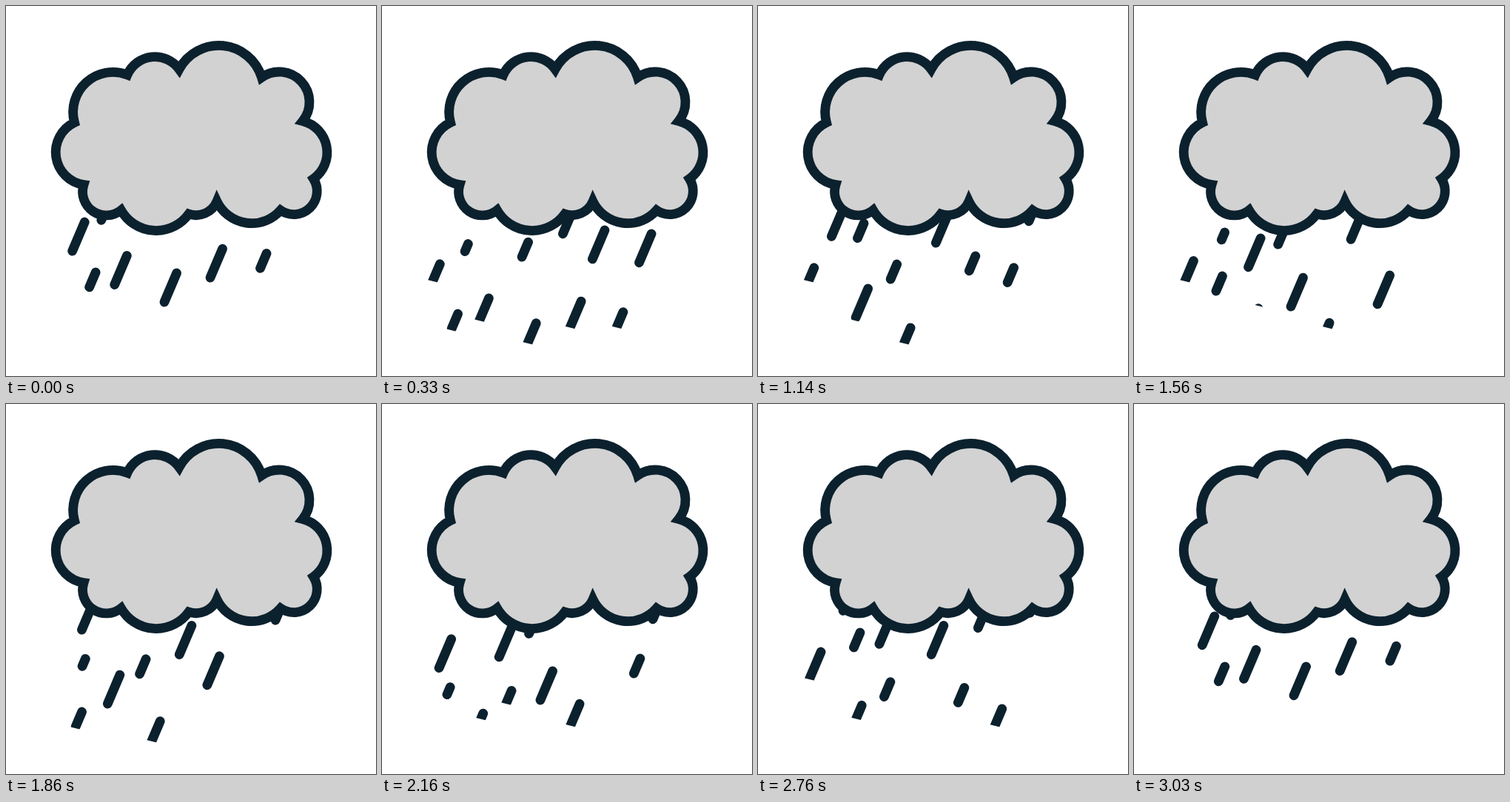
These frames come from a looping animation (500x500 px, 3060 ms). An HTML page with a canvas:

```html
<!DOCTYPE html>
<html lang="en">
<head>
<meta charset="utf-8">
<title>Rain cloud</title>
<style>
  html, body { margin: 0; width: 100%; height: 100%; overflow: hidden; background: #fff; }
  canvas { display: block; }
</style>
</head>
<body>
<canvas id="stage" width="500" height="500"></canvas>
<script>
const LOOP = 3060, STEP = 30;
const INK = '#0c212e', GREY = '#d2d2d2';
const LONG = 39, SHORT = 20, TINY = 10; // drop heights
const LEAN = 0.425, TILT = 0.25, LEVEL = 400;
const ctx = document.getElementById('stage').getContext('2d');

// One arc per puff, clockwise from the left.
const cloud = new Path2D(`M92.5 157.5
  A54 54 0 0 1 164 93       A40.5 40.5 0 0 1 234 85.5
  A60.6 60.6 0 0 1 345.5 96.5 A40.9 40.9 0 0 1 401 155.5
  A43.7 43.7 0 0 1 415.5 233.5 A31.4 31.4 0 0 1 371 276
  A52 52 0 0 1 285 264      A30.5 30.5 0 0 1 247 281
  A54.5 54.5 0 0 1 155.5 276 A32 32 0 0 1 105 241.5
  A44.4 44.4 0 0 1 92.5 157.5Z`);

// Drops fall along a slanted lane; the leftmost lanes slant more.
const drift = x => 0.33 + Math.max(0, 105 - x) * 0.0033;

// Distance past LEVEL of a drop that crosses it at the given time in the loop.
function fallen(t, crossing, speed) {
  const age = (t - crossing + 1.5 * LOOP) % LOOP - LOOP / 2;
  return speed * age;
}

// x: where drops cross LEVEL; end: height where they vanish;
// first, gap: a drop crosses at first, then again every gap ms until the loop ends.
function rain(t, { size, x, speed, end, first, gap }) {
  const slant = drift(x), edgeX = x - slant * (end - LEVEL);
  ctx.save();
  ctx.beginPath();
  ctx.moveTo(edgeX - 100, 0);
  ctx.lineTo(edgeX + 150, 0);
  ctx.lineTo(edgeX + 150, end + TILT * 150);
  ctx.lineTo(edgeX - 100, end - TILT * 100);
  ctx.clip();
  ctx.beginPath();
  for (let crossing = first; crossing < LOOP; crossing += gap) {
    const fall = fallen(t, crossing, speed);
    if (fall < -150) continue; // still above the cloud base
    const footX = x - slant * fall, footY = LEVEL + fall;
    ctx.moveTo(footX, footY);
    ctx.lineTo(footX + LEAN * size, footY - size);
  }
  ctx.stroke();
  ctx.restore();
}

const left = { size: LONG, x: 55.7, speed: 0.172, end: 372 };
const middle = { size: LONG, x: 139, speed: 0.174, end: 425 };
const small = { size: SHORT, x: 169, speed: 0.142, end: 405 };
const centre = { size: LONG, x: 214, speed: 0.205, end: 455.5 };
const inner = { x: 265.2, speed: 0.215, end: 434.5 };
const outer = { x: 330, speed: 0.267, end: 434.5 };
const showers = [
  { ...left, first: 401, gap: 1255 },
  { ...left, first: 1182, gap: 1230 },
  { size: TINY, x: 85, speed: 0.128, end: 405, first: 865, gap: 1352 },
  { size: SHORT, x: 106, speed: 0.17, end: 438, first: 118, gap: LOOP / 2 },
  { ...middle, first: 135, gap: 1696 },
  { ...middle, first: 1020, gap: 1474 },
  { ...small, first: 759, gap: 1349 },
  { ...small, first: 1358, gap: 1433 },
  { ...centre, first: 0, gap: LOOP / 2 },
  { ...centre, first: 780, gap: 1380 },
  { ...inner, size: LONG, first: 153, gap: LOOP },
  { ...inner, size: LONG, first: 600, gap: 1354 },
  { ...inner, size: SHORT, x: 271.5, first: 1336, gap: 1408 },
  { ...outer, size: LONG, first: 529, gap: LOOP / 3 },
  { ...outer, size: SHORT, x: 328.5, speed: 0.24, first: 190, gap: 1060 }
];

function draw(t) {
  ctx.fillStyle = '#fff';
  ctx.fillRect(0, 0, 500, 500);
  ctx.strokeStyle = INK;
  ctx.lineWidth = 12.8;
  ctx.lineCap = 'round';
  showers.forEach(shower => rain(t, shower));
  ctx.fillStyle = GREY;
  ctx.fill(cloud);
  ctx.stroke(cloud);
}

const start = performance.now();
function tick() {
  const t = (performance.now() - start) % LOOP;
  draw(Math.floor(t / STEP) * STEP);
  requestAnimationFrame(tick);
}
tick();
</script>
</body>
</html>
```
